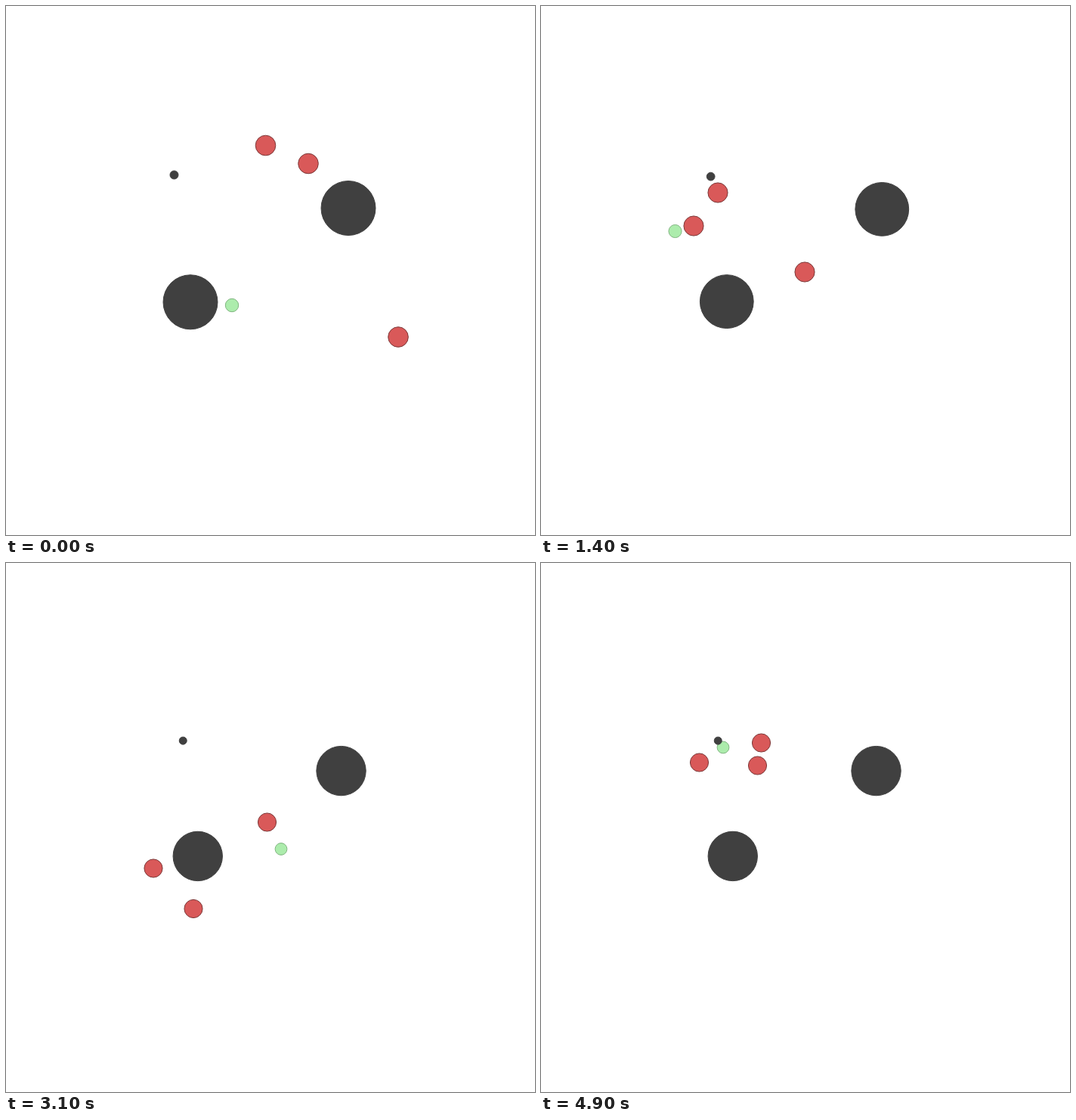
These frames come from a looping animation (700 px wide and 700 px high, 5 s). An HTML page with a canvas:

```html
<!DOCTYPE html>
<html lang="en">
<head>
<meta charset="utf-8">
<title>Pursuit</title>
<style>
  html, body { margin: 0; width: 100%; height: 100%; overflow: hidden; background: #fff; }
  canvas { display: block; }
</style>
</head>
<body>
<canvas id="stage" width="700" height="700"></canvas>
<script>
const ctx = document.getElementById('stage').getContext('2d');
const STEP = 100, STEPS = 50, MID = 350;

// Steps at which every mover passes its next waypoint
const times = [0, 6, 8, 14, 18, 23, 31, 36, 42, 49];

const red = { r: 13.3, fill: '#d95959', line: '#7a3838' };
const green = { r: 8.7, fill: '#acecac', line: '#80b480' };
const dark = { fill: '#404040', line: '#404040' };

const movers = [
  { ...red, xs: [343.5, 321, 301, 202, 168, 174.5, 248, 306, 320.5, 286.5],
            ys: [184.5, 242, 272, 291, 337, 400, 457.5, 433, 351, 268] },
  { ...red, xs: [400, 358, 339.5, 234, 192, 197.5, 195, 184, 184.5, 209.5],
            ys: [208.5, 233, 239, 247, 299, 374, 404, 389, 357, 264] },
  { ...red, xs: [519, 451, 426, 349, 305, 276, 345.5, 380, 387.5, 291.5],
            ys: [438, 416, 401, 352, 322, 315, 343, 306, 263, 238] },
  { ...green, xs: [299, 278, 242.5, 177.5, 168, 245.5, 364, 413, 326.5, 241],
              ys: [396, 308, 279.5, 298, 374, 430.5, 378.5, 293.5, 226.5, 244] }
];

// Offsets from the centre at full zoom
const obstacles = [
  { ...dark, x: -106, y: 41.8, r: 36 },
  { ...dark, x: 103, y: -82.5, r: 36 },
  { ...dark, x: -127.5, y: -126.5, r: 5.5 }
];

const smooth = u => u * u * (3 - 2 * u);

// The view widens once, while the chase runs past the left edge
const zoomAt = step => 1 - 0.092 * smooth(Math.min(Math.max((step - 11) / 11, 0), 1));

// Speed through waypoint i; everything starts at rest
function slope(vals, i) {
  if (i === 0) return 0;
  const j = Math.min(i + 1, times.length - 1);
  return (vals[j] - vals[i - 1]) / (times[j] - times[i - 1]);
}

// Smooth curve through the waypoints
function along(vals, step) {
  let i = 0;
  while (i < times.length - 2 && times[i + 1] <= step) i++;
  const span = times[i + 1] - times[i], u = (step - times[i]) / span;
  return vals[i] + (vals[i + 1] - vals[i]) * smooth(u) +
    span * u * (1 - u) * (slope(vals, i) * (1 - u) - slope(vals, i + 1) * u);
}

function disc({ r, fill, line }, x, y, zoom) {
  ctx.beginPath();
  ctx.arc(x, y, r * zoom, 0, 2 * Math.PI);
  ctx.fillStyle = fill;
  ctx.strokeStyle = line;
  ctx.fill();
  ctx.stroke();
}

function draw(step) {
  const zoom = zoomAt(step);
  ctx.clearRect(0, 0, 700, 700);
  for (const m of movers) disc(m, along(m.xs, step), along(m.ys, step), zoom);
  for (const o of obstacles) disc(o, MID + o.x * zoom, MID + o.y * zoom, zoom);
}

const start = performance.now();
function tick() {
  draw(Math.floor((performance.now() - start) / STEP) % STEPS);
  requestAnimationFrame(tick);
}
tick();
</script>
</body>
</html>
```
